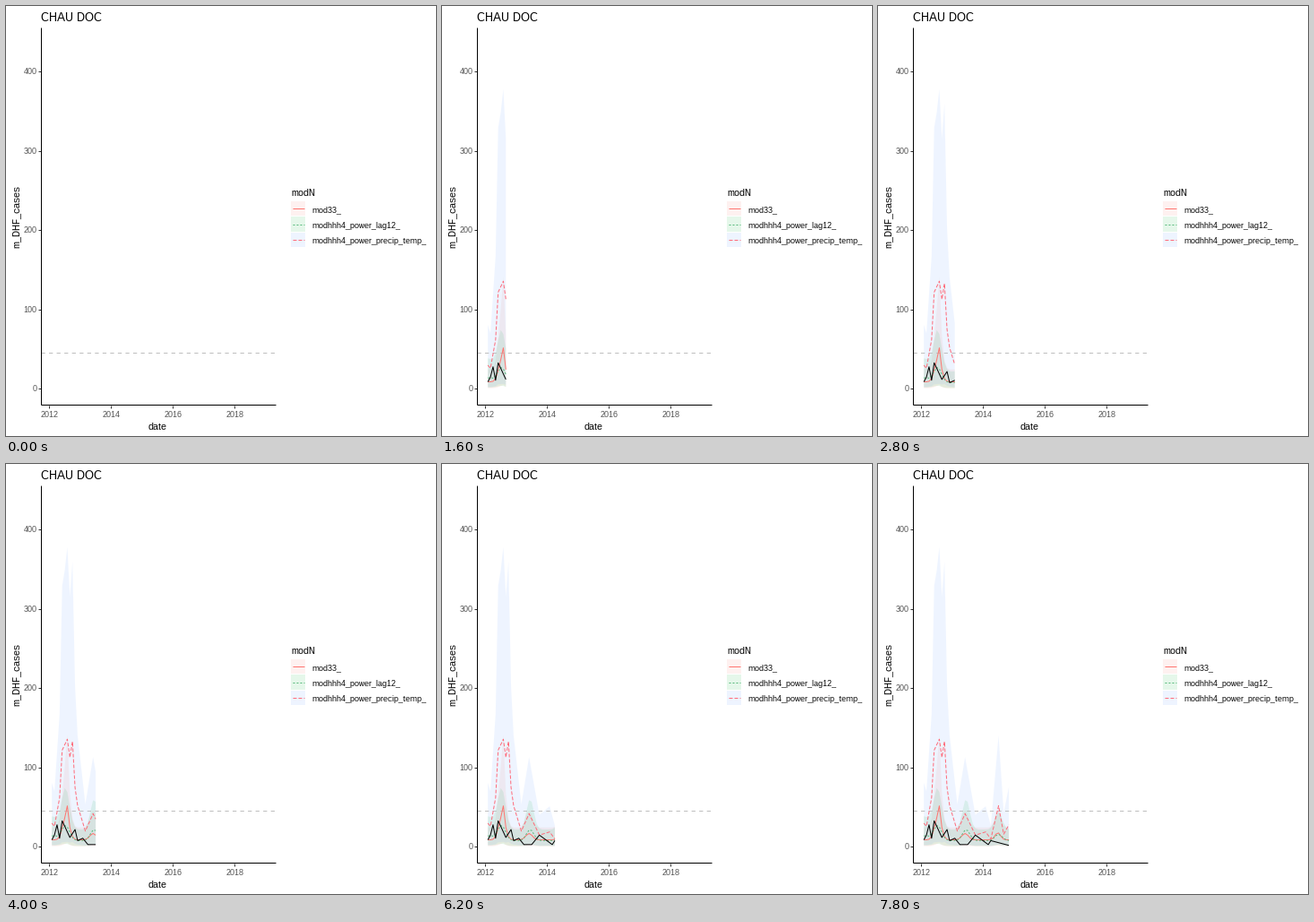
Animation of 480 by 480 pixels, one loop 8000 ms. Source, as a matplotlib script:

```python
import numpy as np
import matplotlib.pyplot as plt
from matplotlib.animation import FuncAnimation
from matplotlib.patches import Polygon, Rectangle

plt.rcParams.update({
    "font.family": "Liberation Sans",
    "text.hinting": "native",
    "text.hinting_factor": 1,
})

SIZE, DPI = 480, 72
FRAMES, STEP_MS = 40, 200
START_X, MONTH_W = 51.2, 2.875
REVEAL = 83 / 99  # months uncovered per frame
MONTHS = 34  # counted from February 2012

RED, GREEN, BLUE = "#F8766D", "#00BA38", "#619CFF"

month = np.arange(MONTHS)


def bump(center, height, width):
    return height * np.exp(-((month - center) / width) ** 2)


def knots(**points):
    """Monthly values between key points given as m<month>=value."""
    at = [int(k[1:]) for k in points]
    return np.interp(month, at, list(points.values()))


# Yearly outbreaks around July on a low baseline
cases = knots(m0=9, m1=15, m2=28, m3=11, m4=33, m7=12, m9=22, m10=8,
              m12=11, m14=3, m17=3, m20=15, m25=3, m26=8, m33=2)
mod33 = 9 + bump(5.5, 29, 1.8) + bump(6, 16, 0.6) + bump(16, 8, 1.8) \
    + bump(28.7, 9, 1.5)
lag12 = 8 + bump(0, 6, 3) + bump(5.3, 19, 2.2) + bump(16.4, 14, 2) \
    + bump(29, 8, 2)
precip = knots(m0=30, m1=26, m3=62, m4=122, m6=136, m7=113, m8=133,
               m9=75, m10=52, m13=20, m16=42, m20=15, m24=19, m26=10,
               m29=52, m31=16, m33=28)

# name, fill, stroke, dash, values, upper bound, lower bound
models = [
    ("mod33_", RED, "#FF7570", "-", mod33, 2.73 * mod33, 0.1 * mod33),
    ("modhhh4_power_lag12_", GREEN, "#55B87A", (0, (2, 2)),
     lag12, 2.75 * lag12, 0.15 * lag12),
    ("modhhh4_power_precip_temp_", BLUE, "#FF6B7A", (0, (4, 2)),
     precip, 2.7 * precip + bump(6.5, 16, 0.8), 1 + 0.04 * precip),
]


def px(m):
    return START_X + MONTH_W * m


def py(v):
    return 427.5 - 0.885 * v


fig = plt.figure(figsize=(SIZE / DPI, SIZE / DPI), dpi=DPI, facecolor="white")
ax = fig.add_axes([0, 0, 1, 1])
ax.set_xlim(0, SIZE)
ax.set_ylim(SIZE, 0)
ax.axis("off")


def line(xs, ys, color, z=3, style="-"):
    return ax.plot(xs, ys, color=color, lw=1, ls=style, zorder=z,
                   dash_capstyle="butt", solid_capstyle="butt")[0]


def label(x, y, s, size, color="black", ha="left", **kw):
    kw.setdefault("va", "baseline")
    ax.text(x, y, s, fontsize=size, color=color, ha=ha, **kw)


# Axes, titles and threshold; straight lines snap to whole pixels
line([39, 39], [24, 445], "black", 5)
line([39, 301], [445, 445], "black", 5)
for v in range(0, 401, 100):
    y = np.floor(py(v))
    line([36, 39], [y, y], "#333333")
    label(34.3, y + 3, str(v), 9, "#4D4D4D", "right")
for i in range(4):
    x = 48 + 69 * i
    line([x, x], [446, 449], "#333333")
    label(x + 0.3, 459, str(2012 + 2 * i), 9, "#4D4D4D", "center")

label(39, 17, "CHAU DOC", 13)
label(169.5, 473, "date", 11, ha="center")
label(11.5, 235, "m_DHF_cases", 11, ha="center", va="center", rotation=90)
line([39, 301], [387, 387], "#BEBEBE", 2, (0, (4.27, 4.27)))

label(318, 212, "modN", 11)
series = [(line([], [], "black", 4), cases)]
ribbons = []
for i, (name, fill, stroke, dash, mid, top, low) in enumerate(models):
    y = 218.1 + 17.28 * i
    ax.add_patch(Rectangle((318, y), 16, 16.3, fc=fill, alpha=0.1, lw=0))
    line([320, 333], [y + 8.15, y + 8.15], stroke, style=dash)
    label(341, np.round(y + 12.4), name, 9)

    band = Polygon([[0, 0]] * 3, closed=True, fc=fill, alpha=0.1, lw=0,
                   zorder=1)
    ax.add_patch(band)
    ribbons.append((band, top, low))
    series.append((line([], [], stroke, 3, dash), mid))


def draw(frame):
    # Only whole months are shown
    n = int(round(frame * REVEAL)) + 1
    x = px(month[:n])
    for artist, values in series:
        artist.set_visible(n > 1)
        artist.set_data(x, py(values[:n]))
    for band, top, low in ribbons:
        band.set_visible(n > 1)
        edge = np.append(py(top[:n]), py(low[:n])[::-1])
        band.set_xy(np.column_stack([np.append(x, x[::-1]), edge]))
    return [a for a, _ in series] + [r[0] for r in ribbons]


anim = FuncAnimation(fig, draw, frames=FRAMES, interval=STEP_MS,
                     repeat=True, repeat_delay=0, blit=False)
plt.show()
```
